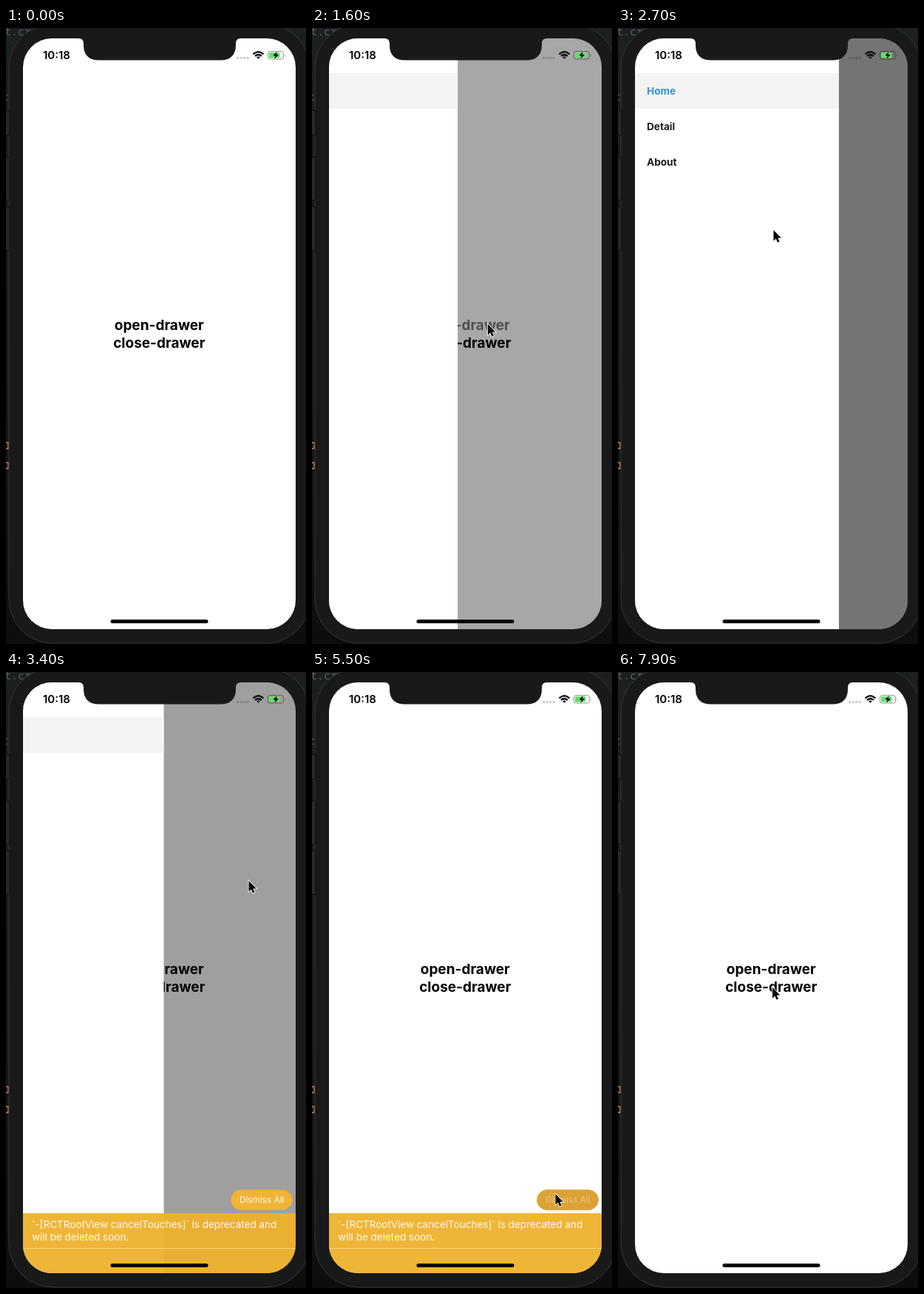
Write an HTML page that moves like this. It is 406 px wide and 832 px high and loops after 8000 ms.

```html
<!DOCTYPE html>
<html lang="en">
<head>
<meta charset="utf-8">
<title>Drawer demo</title>
<style>
  html, body { margin: 0; width: 100%; height: 100%; overflow: hidden; background: #1a1c1d; }
  svg { display: block; font-family: Inter, sans-serif; }
  .link { font-size: 19px; font-weight: 700; text-anchor: middle; }
  .item { font-size: 13.6px; font-weight: 700; fill: #1c1c1e; }
  .code { font: 15px "Noto Sans Mono", monospace; fill: #566063; }
  .warn { font-size: 13.5px; fill: #fff; fill-opacity: .93; }
</style>
</head>
<body>
<svg width="406" height="832" viewBox="0 0 406 832">
  <defs>
    <clipPath id="screen"><rect x="23" y="14" width="369" height="798" rx="39"/></clipPath>
    <linearGradient id="desk" x2="0" y2="1">
      <stop stop-color="#1c2021"/><stop offset=".6" stop-color="#17191a"/><stop offset="1" stop-color="#0c0d0f"/>
    </linearGradient>
  </defs>

  <!-- desktop and phone body -->
  <rect width="406" height="832" fill="url(#desk)"/>
  <text class="code" x="-2" y="10">t.cr</text>
  <text class="code" x="-5" y="98">t</text>
  <path d="M0 560h3v8h-3M0 587h3v8h-3" fill="none" stroke="#a26a45" stroke-width="2"/>
  <rect x="4" y="-5" width="407" height="836" rx="59" fill="#191919" stroke="#353636"/>
  <g fill="#292929" stroke="#0d0d0d">
    <rect x="-4" y="111.500" width="9" height="33" rx="1"/>
    <rect x="-4" y="174.500" width="9" height="58" rx="1"/>
    <rect x="-4" y="241.500" width="9" height="59" rx="1"/>
  </g>

  <g clip-path="url(#screen)">
    <rect x="23" y="14" width="369" height="798" fill="#fff"/>
    <text class="link" id="openLink" x="207.300" y="408">open-drawer</text>
    <text class="link" id="closeLink" x="207.300" y="432">close-drawer</text>
    <rect id="shade" x="23" y="14" width="369" height="798"/>
    <g id="drawer">
      <rect x="23" y="14" width="276" height="798" fill="#fff"/>
      <rect x="23" y="61" width="276" height="48" fill="#f3f3f3"/>
      <text class="item" x="39" y="90" style="fill:#2f95dc">Home</text>
      <text class="item" x="39" y="138">Detail</text>
      <text class="item" x="39" y="186">About</text>
    </g>
    <g id="banner">
      <rect x="23" y="731" width="369" height="81" fill="#efb12c" fill-opacity=".95"/>
      <path d="M23 778.500H392" stroke="#fff" stroke-opacity=".4"/>
      <text class="warn" x="35" y="751">`-[RCTRootView cancelTouches]` is deprecated and</text>
      <text class="warn" x="35" y="768">will be deleted soon.</text>
      <rect id="button" x="304.500" y="699.500" width="83" height="27" rx="13.500" stroke="#e5aa3c"/>
      <text class="warn" id="dismiss" x="316" y="717" style="font-size:11.8px">Dismiss All</text>
    </g>
  </g>

  <!-- notch, status bar, home indicator -->
  <path d="M98 13V14Q105 14 105 21V23Q105 43.500 126 43.500H290Q311 43.500 311 23V21Q311 14 318 14V13Z" fill="#191919"/>
  <text x="50" y="42" font-size="15" font-weight="600">10:18</text>
  <path d="M313.700 40.500h14" stroke="#000" stroke-opacity=".24" stroke-width="3.200" stroke-linecap="round" stroke-dasharray="0 4.500"/>
  <g fill="none" stroke="#000" stroke-width="2.300">
    <path d="M334.600 35.300Q341.500 29 348.400 35.300M337.100 38Q341.500 34.100 345.900 38"/>
    <path d="M341.500 41.800L339.200 39.500Q341.500 37.700 343.800 39.500Z" fill="#000" stroke="none"/>
  </g>
  <rect x="354.500" y="31.500" width="21" height="10.500" rx="3" fill="none" stroke="#000" stroke-opacity=".42"/>
  <path d="M377 35v4q1.500-2 0-4" fill-opacity=".42"/>
  <rect x="356" y="33" width="14.500" height="7.500" rx="1.500" fill="#5fe066"/>
  <path d="M367 31.500L361 37.600H364.500L363.200 42L369.300 35.800H365.700Z" stroke="#fff" stroke-opacity=".55" paint-order="stroke"/>
  <rect x="141.500" y="799" width="132" height="5" rx="2.500"/>

  <path id="cursor" d="M0 0V14.500L3.300 11.400L5.500 16.600L8 15.500L5.800 10.500H10.300Z" stroke="#fff" stroke-width="1.600" paint-order="stroke"/>
</svg>

<script>
const LOOP = 8000, STEP = 100, DRAWER_WIDTH = 276;
const part = id => document.getElementById(id);
const [openLink, closeLink, shade, drawer, banner, button, dismiss, cursor] =
  ["openLink", "closeLink", "shade", "drawer", "banner", "button", "dismiss", "cursor"].map(part);

// [time, x, y] of the pointer tip
const POINTER = [
  [500, 153, 453], [600, 162, 456], [700, 162, 456], [900, 238, 400], [1700, 238, 400],
  [2400, 230, 326], [2700, 210.5, 273], [3100, 350, 276], [3300, 328.5, 282], [3600, 328.5, 282],
  [4200, 293, 686], [5100, 346, 704], [5200, 355, 713], [5300, 329.5, 705], [5800, 329.5, 705],
  [6300, 207, 421], [6500, 207, 421], [6600, 209, 426], [LOOP, 209, 426]
];

const clamp = v => Math.min(1, Math.max(0, v));
const easeInOut = v => v < .5 ? 2 * v * v : 1 - 2 * (1 - v) ** 2;

// critically damped spring from 0 to 1
function spring(ms) {
  const k = Math.max(0, ms) * .0212;
  return 1 - (1 + k) * Math.exp(-k);
}

// touch feedback: fade to 20% on press, back on release
function touch(t, press, release) {
  const down = easeInOut(clamp((t - press) / 150));
  const up = easeInOut(clamp((t - release) / 250));
  return 1 - .8 * down * (1 - up);
}

function pointerAt(t) {
  const i = POINTER.findIndex(key => key[0] > t);
  const [t0, x0, y0] = POINTER[i - 1], [t1, x1, y1] = POINTER[i];
  const f = (t - t0) / (t1 - t0);
  return [x0 + (x1 - x0) * f, y0 + (y1 - y0) * f];
}

function show(el, on) {
  el.style.display = on ? "" : "none";
}

function draw(t) {
  const opened = spring(t - 1499) * (1 - spring(t - 3347));
  drawer.setAttribute("transform", `translate(${DRAWER_WIDTH * (opened - 1)})`);
  shade.style.opacity = .545 * opened;

  openLink.style.opacity = touch(t, 1165, 1488);
  closeLink.style.opacity = touch(t, 6565, 6955) * touch(t, 7265, 7655);

  const pressed = t >= 5500;
  show(banner, t >= 3400 && t < 5600);
  button.style.fill = pressed ? "#dda236" : "#f0b437";
  dismiss.style.opacity = pressed ? .4 : 1;

  show(cursor, t >= 500);
  if (t >= 500) cursor.setAttribute("transform", `translate(${pointerAt(t)})`);
}

function tick() {
  draw(Math.floor(performance.now() % LOOP / STEP) * STEP);
  requestAnimationFrame(tick);
}
tick();
</script>
</body>
</html>
```
